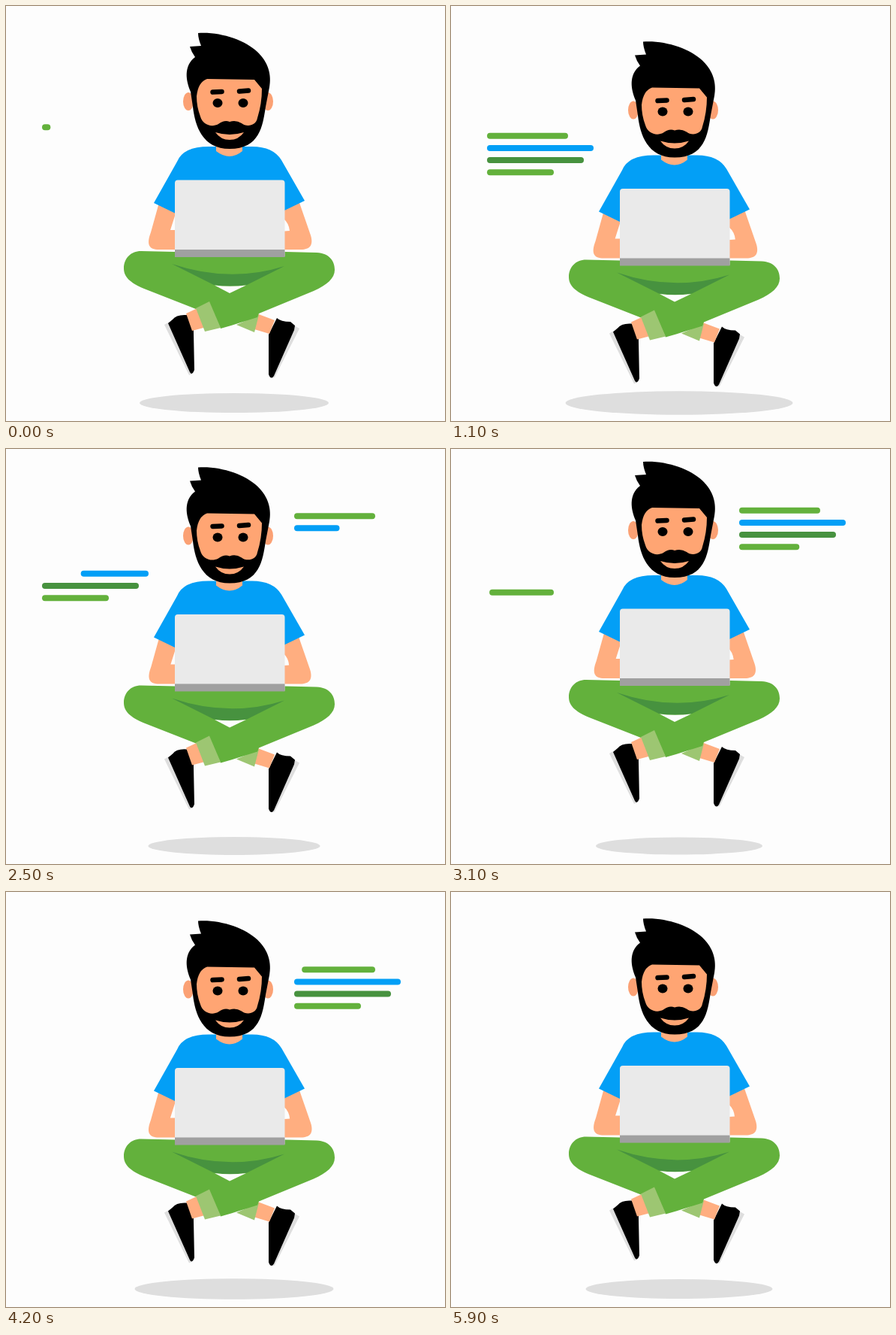
These frames come from a looping animation (585x552 px, 6 s). An HTML page with a canvas:

```html
<!DOCTYPE html>
<html lang="en">
<head>
<meta charset="utf-8">
<title>Floating coder</title>
<style>
html, body { margin: 0; width: 100%; height: 100%; overflow: hidden; background: #fdfdfd; }
canvas { display: block; }
</style>
</head>
<body>
<canvas id="stage" width="585" height="552"></canvas>
<script>
const ctx = document.getElementById('stage').getContext('2d');
const LOOP = 6000, STEP = 100;
const GREEN = '#63b13c', DARK_GREEN = '#47923f', CUFF = '#9dc672', BLUE = '#039ff6';
const SKIN = '#ffae80', FACE = '#ffa573', EAR = '#fba174', BLACK = '#000', SOLE = '#dedede';

// [time, body offset]
const hover = [[0, 0], [700, 8.2], [1000, 12], [1100, 11.5], [1400, 7], [2000, -1], [2800, -18],
  [2950, -20.5], [3100, -19], [3500, -10], [4200, 2.5], [4900, 12.3], [5000, 12.5], [5600, 4], [5900, -0.4]];
// [time, shadow radius]
const shadow = [[0, 126], [700, 144.5], [1000, 153], [1100, 151.5], [1400, 140], [2000, 124],
  [2950, 110.5], [3100, 111], [4200, 132.5], [4900, 154], [5000, 154.5], [5600, 133], [5900, 124.5]];
const blink = [[0, 1], [4800, 1], [4900, 0.5], [5000, 0.2], [5100, 0.6], [5200, 1], [6000, 1]];

// Code lines: [width, colour]
const codeLines = [[108, GREEN], [142, BLUE], [129, DARK_GREEN], [89, GREEN]];
const GROW = 240, SHRINK = 363;
const blocks = [
  { x: 48, y: 161.3, enter: -8, leave: 1997 },
  { x: 384, y: 100.8, enter: 2166, leave: 4163 }
];

const clamp = v => Math.min(1, Math.max(0, v));

function linear(keys, t) {
  const i = Math.max(1, keys.findIndex(k => k[0] >= t));
  const [a, b] = [keys[i - 1], keys[i]];
  return a[1] + (b[1] - a[1]) * (t - a[0]) / (b[0] - a[0]);
}

function smooth(keys, t) {
  const found = keys.findIndex(k => k[0] >= t);
  const i = found < 0 ? keys.length - 1 : Math.max(1, found);
  const secant = j => (keys[j][1] - keys[j - 1][1]) / (keys[j][0] - keys[j - 1][0]);
  // Harmonic mean tangents never overshoot a key
  const tangent = j => {
    if (j === 0) return secant(1);
    if (j === keys.length - 1) return secant(j);
    const a = secant(j), b = secant(j + 1);
    return a * b <= 0 ? 0 : 2 * a * b / (a + b);
  };
  const [t0, v0] = keys[i - 1], [t1, v1] = keys[i];
  const h = t1 - t0, u = (t - t0) / h, w = 1 - u;
  return v0 * (1 + 2 * u) * w * w + tangent(i - 1) * h * u * w * w
    + v1 * u * u * (3 - 2 * u) - tangent(i) * h * u * u * w;
}

function shape(color, path) {
  ctx.fillStyle = color;
  ctx.fill(new Path2D(path));
}

function oval(color, x, y, rx, ry) {
  ctx.fillStyle = color;
  ctx.beginPath();
  ctx.ellipse(x, y, rx, ry, 0, 0, Math.PI * 2);
  ctx.fill();
}

function stroke(color, width, x1, y1, x2, y2) {
  ctx.strokeStyle = color;
  ctx.lineWidth = width;
  ctx.lineCap = 'round';
  ctx.beginPath();
  ctx.moveTo(x1, y1);
  ctx.lineTo(x2, y2);
  ctx.stroke();
}

function shifted(dx, dy, draw) {
  ctx.save();
  ctx.translate(dx, dy);
  draw();
  ctx.restore();
}

function drawCode(t) {
  for (const { x, y, enter, leave } of blocks) {
    codeLines.forEach(([width, color], i) => {
      const grown = clamp((t - enter - i * GROW) / GROW);
      const gone = clamp((t - leave - i * SHRINK) / SHRINK);
      if (grown === 0 || gone === 1) return;
      const left = x + 4, span = width - 8, row = y + i * 16.15;
      stroke(color, 8, left + span * gone, row, left + span * grown, row);
    });
  }
}

function drawArms(spread) {
  shifted(-spread / 2, 0, () => shape(SKIN,
    'M205 258 L193 301 C187 317 190 324 204 324 L232 324 V298 L219 298 L226 276 L226 262Z'));
  shifted(spread, 0, () => shape(SKIN,
    'M389 256 L406 305 C410 318 405 324 393 324 L364 324 V300 L378 299 Q377 289 370 283 L370 262Z'));
}

function drawShirt() {
  shape(BLUE, 'M197 262 L228 207 Q236 187 270 187 L328 187 Q356 187 367 205 L398 259 L371 272 V326 H226 V276Z');
  shape(SKIN, 'M280 182 H315 V193 Q298 207 280 193Z');
}

function drawLegs() {
  shape(SKIN, 'M255 402 L240 409 L248 432 L267 427Z');
  shape(SKIN, 'M334 409 L358 418 L351 436 L331 430Z');
  shape(CUFF, 'M307 424 L337 411 L331 434Z');
  shape(GREEN, 'M180 326 L225 327 H372 L414 328 C431 329 438 339 438 351 '
    + 'C438 362 428 371 410 379 L337 409 L335 414 L300 425 L286 429 L270 395 L253 403 '
    + 'L184 376 C165 368 157 360 157 349 C157 336 166 326 180 326Z');
  shape(CUFF, 'M253 402 L271 393 L286 428 L265 433Z');
  shape(DARK_GREEN, 'M221 343 Q298 369 371 346 L321 371 Q298 374 277 371Z');
  shape('#fdfdfd', 'M278 371.5 Q298 374 320 371.5 L298 382Z');
}

function drawShoes() {
  shape(SOLE, 'M211 424 L218 420 L248 489 L244 491Z');
  shape(BLACK, 'M216 422 L222 417 Q227 410 241 411 L249 423 Q250 427 250 435 L251 484 Q248 492 245 487Z');
  shape(SOLE, 'M384 425 L391 429 L358 494 L354 495Z');
  shape(BLACK, 'M361 415 Q366 420 379 420 L385 425 L384 431 L357 492 Q353 498 350 490 L350 437Z');
}

function drawLaptop() {
  ctx.fillStyle = '#eaeaea';
  ctx.beginPath();
  ctx.roundRect(225, 231.5, 146.5, 102, [4, 4, 1, 1]);
  ctx.fill();
  ctx.fillStyle = '#a0a0a0';
  ctx.fillRect(225, 324, 146.5, 10);
}

function drawHead(eyeOpen) {
  oval(EAR, 243, 127, 7, 12);
  oval(EAR, 349, 127, 7, 12);
  shape(BLACK, 'M256 36 C285 34 318 45 335 61 C350 75 354 92 351 108 L346 134 '
    + 'C342 160 338 190 298 190 C262 190 252 160 249 134 L246 114 C240 100 236 80 252 68 '
    + 'Q247 61 245 54 L260 53 Q256 43 256 36Z');
  shape(FACE, 'M254 120 Q256 101 268 97 L331 98 L341 110 Q341 130 335 149 '
    + 'C333 160 320 161 314 156 Q306 151 298 154 Q291 151 283 157 '
    + 'C274 162 262 158 259 147 Q254 134 254 120Z');
  shape(FACE, 'M279 168 Q298 174 317 168 Q310 178 298 178 Q286 178 279 168Z');
  stroke(BLACK, 6.5, 275.5, 114.5, 287.5, 114);
  stroke(BLACK, 6.5, 311, 113.5, 323, 112.5);
  oval(BLACK, 282, 129, 6.5, 6 * eyeOpen);
  oval(BLACK, 316, 129, 6.5, 6 * eyeOpen);
}

function draw(t) {
  const lift = smooth(hover, t), radius = smooth(shadow, t);
  ctx.fillStyle = '#fdfdfd';
  ctx.fillRect(0, 0, 585, 552);
  oval('#dedede', 304, 528, radius, radius * 0.104);
  shifted(0, lift, () => {
    drawCode(t);
    drawArms(lift * 0.07);
    drawShirt();
    drawShoes();
    drawLegs();
    drawLaptop();
    drawHead(linear(blink, t));
  });
}

const start = performance.now();

function tick() {
  const elapsed = (performance.now() - start) % LOOP;
  draw(Math.floor(elapsed / STEP) * STEP);
  requestAnimationFrame(tick);
}
tick();
</script>
</body>
</html>
```
